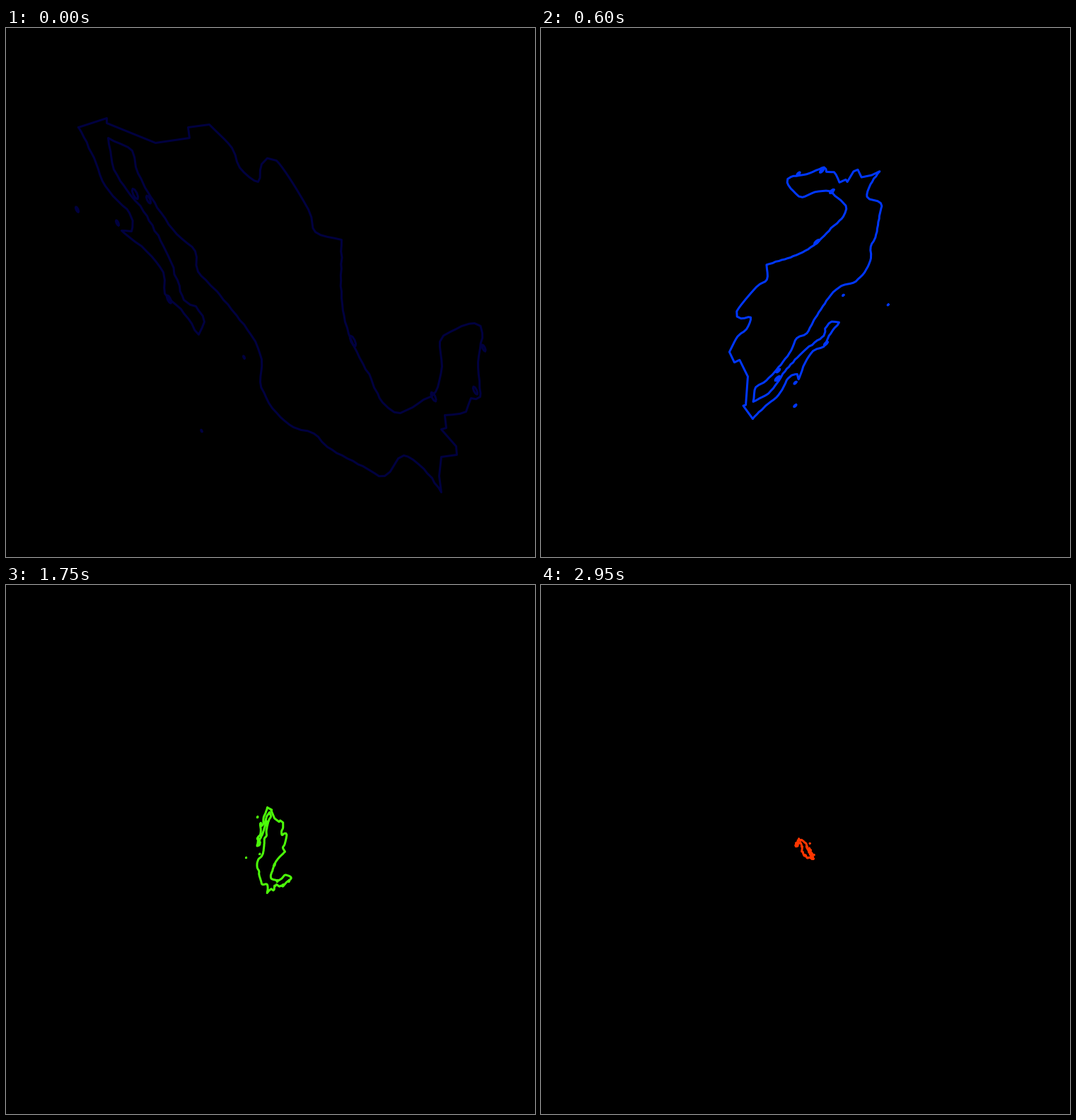
A matplotlib script for the animation above (3 s loop, 748 px wide and 748 px high).

```python
import numpy as np
import matplotlib.pyplot as plt
from matplotlib.animation import FuncAnimation
from matplotlib.colors import LinearSegmentedColormap

SIZE, DPI = 748, 100
FRAMES, INTERVAL = 60, 50
SHRINK, TURN = 0.95, np.radians(9)
LINE_PX = 3
MIDDLE = (SIZE - 1) / 2 * (1 + 1j)
GAP = [complex(np.nan, np.nan)]

rng = np.random.default_rng(4)


def curve(points, rough=0.0, step=8):
    """Catmull-Rom curve through the points, with a ragged edge if rough."""
    p = np.array([complex(*xy) for xy in points])
    slope = np.gradient(p)
    parts = []
    for a, b, va, vb in zip(p, p[1:], slope, slope[1:]):
        n = max(2, int(abs(b - a) / step))
        t = np.arange(n) / n
        z = ((1 + 2 * t) * (1 - t)**2 * a + t * (1 - t)**2 * va
             + t * t * (3 - 2 * t) * b - t * t * (1 - t) * vb)
        noise = rng.normal(size=n) + 1j * rng.normal(size=n)
        parts.append(z + rough * noise * (t > 0))
    return np.concatenate(parts + [p[-1:]])


def straight(points):
    return np.array([complex(*xy) for xy in points])


def islet(x, y, r, tilt=np.radians(65), slim=0.35):
    a = np.linspace(0, 2 * np.pi, 9)
    return x + 1j * y + r * np.exp(1j * tilt) * (np.cos(a) + 1j * slim * np.sin(a))


# Key points, clockwise from the north-west corner (y down)
desert = straight([(102, 140), (142, 127), (142, 134), (211, 162),
                   (259, 155), (257, 140), (287, 136)])
river = curve([(287, 136), (319, 169), (330, 197), (356, 217), (361, 192),
               (382, 187), (427, 256), (437, 288), (474, 299)])
gulf = curve([(474, 299), (474, 372), (484, 432), (516, 496), (532, 529),
              (557, 544), (590, 525), (607, 514), (616, 478), (613, 443),
              (628, 429), (662, 417), (673, 431), (667, 472), (670, 521),
              (657, 523), (650, 542), (620, 547)], 0.5)
jungle = straight([(620, 547), (622, 565), (615, 567), (636, 591),
                   (637, 603), (615, 606), (612, 633), (615, 656)])
pacific = curve([(615, 656), (595, 629), (562, 604), (535, 633), (504, 619),
                 (454, 592), (435, 573), (406, 564), (376, 537), (359, 500),
                 (361, 468), (345, 432), (298, 372), (271, 344), (267, 315),
                 (241, 291), (219, 261), (196, 225), (183, 196), (178, 173),
                 (144, 155)], 0.6)
inner = curve([(144, 155), (157, 208), (194, 259), (229, 322), (251, 384),
               (268, 393), (280, 415), (272, 433)], 0.6)
outer = curve([(272, 433), (247, 397), (224, 375), (222, 345), (198, 315),
               (163, 286), (177, 287), (174, 261), (140, 223), (124, 183),
               (102, 140)], 0.6)

islands = [(100, 256, 4), (157, 275, 4), (201, 242, 6), (182, 234, 8),
           (336, 465, 2), (276, 569, 1.5), (675, 452, 5),
           (604, 521, 7), (230, 383, 6), (663, 512, 6), (490, 442, 8)]

loops = [np.concatenate([desert, river, gulf, jungle, pacific, inner, outer])]
loops += [islet(*i) for i in islands]
shape = np.concatenate([np.append(z, GAP) for z in loops]) - MIDDLE

# Evenly spaced stops; the loop starts half a stop after black
ramp = LinearSegmentedColormap.from_list("ramp", [
    "#000000", "#000080", "#0036ff", "#00aadd", "#00ee55",
    "#55ff00", "#ffe600", "#ff8c00", "#ff2d00"])

fig = plt.figure(figsize=(SIZE / DPI, SIZE / DPI), dpi=DPI, facecolor="black")
ax = fig.add_axes([0, 0, 1, 1])
ax.set(xlim=(0, SIZE), ylim=(SIZE, 0))
ax.axis("off")
line, = ax.plot([], [], lw=LINE_PX * 72 / DPI,
                solid_joinstyle="round", solid_capstyle="round")


def update(i):
    z = shape * SHRINK**i * np.exp(-1j * TURN * i) + SIZE / 2 * (1 + 1j)
    line.set_data(z.real, z.imag)
    line.set_color(ramp((i + 4) / (FRAMES + 4)))
    return line,


anim = FuncAnimation(fig, update, frames=FRAMES, interval=INTERVAL,
                     repeat=True, repeat_delay=0)
plt.show()
```
